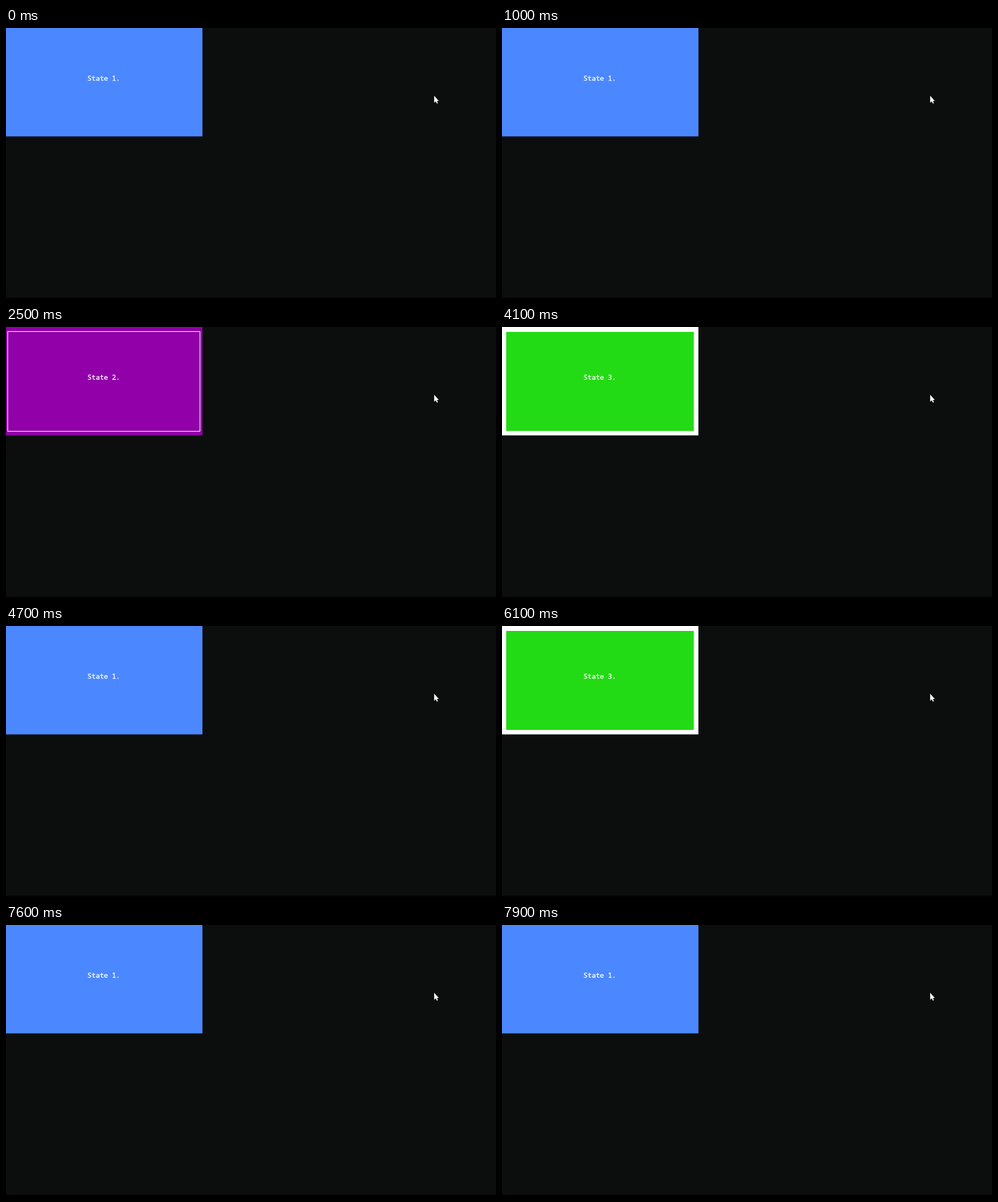
Animation of 696x386 px, one loop 8 s. Source, as an HTML page:

```html
<!DOCTYPE html>
<html lang="en">
<head>
<meta charset="utf-8">
<title>State cycle</title>
<style>
  html, body { margin: 0; width: 100%; height: 100%; overflow: hidden; background: #0b0e0c; }
  svg { display: block; width: 100vw; height: 100vh; }
  text { font: 9.67px "Noto Sans Mono", "DejaVu Sans Mono", monospace; white-space: pre;
         fill: #fff; stroke: #fff; stroke-width: .3px; }
  .outline { fill: none; stroke: #f4def7; }
  .outline, .inner { visibility: hidden; }
  .inner { fill: #22db14; }
  .state1 .panel { fill: #4b88ff; }
  .state2 .panel { fill: #9100a8; }
  .state3 .panel { fill: #fff; }
  .state2 .outline, .state3 .inner { visibility: visible; }
</style>
</head>
<body>
<svg viewBox="0 0 696 386">
  <rect width="696" height="386" fill="#0b0e0c"/>
  <rect y="384" width="696" height="2" fill="#020302"/>
  <g id="view">
    <rect class="panel" width="279" height="154.4"/>
    <rect class="outline" x="2.5" y="6.5" width="273" height="142"/>
    <rect class="inner" x="6" y="7" width="266.5" height="141"/>
    <text id="label" x="115.8" y="75"></text>
  </g>
  <path d="M608.2 96.4V106.6L610.5 104.6L612 107.8L613.5 107.1L612 104H614.8Z" fill="#fff"/>
</svg>
<script>
const LOOP = 8000;
const STATE_COUNT = 3;

// Evenly spaced key presses; each one moves on to the next state.
const burst = (from, count = 1, gap = 0) =>
  Array.from({ length: count }, (_, i) => from + i * gap);

const presses = [
  ...burst(500, 8, 100),
  ...burst(1500),
  ...burst(2500, 2, 700),
  ...burst(4600),
  ...burst(5400, 3, 700),
  ...burst(7300, 6, 115)
];

const view = document.getElementById("view");
const label = document.getElementById("label");
const start = performance.now();

function draw() {
  const time = (performance.now() - start) % LOOP;
  const state = presses.filter(press => press <= time).length % STATE_COUNT + 1;
  view.setAttribute("class", `state${state}`);
  label.textContent = `State ${state}.`;
  requestAnimationFrame(draw);
}
draw();
</script>
</body>
</html>
```
